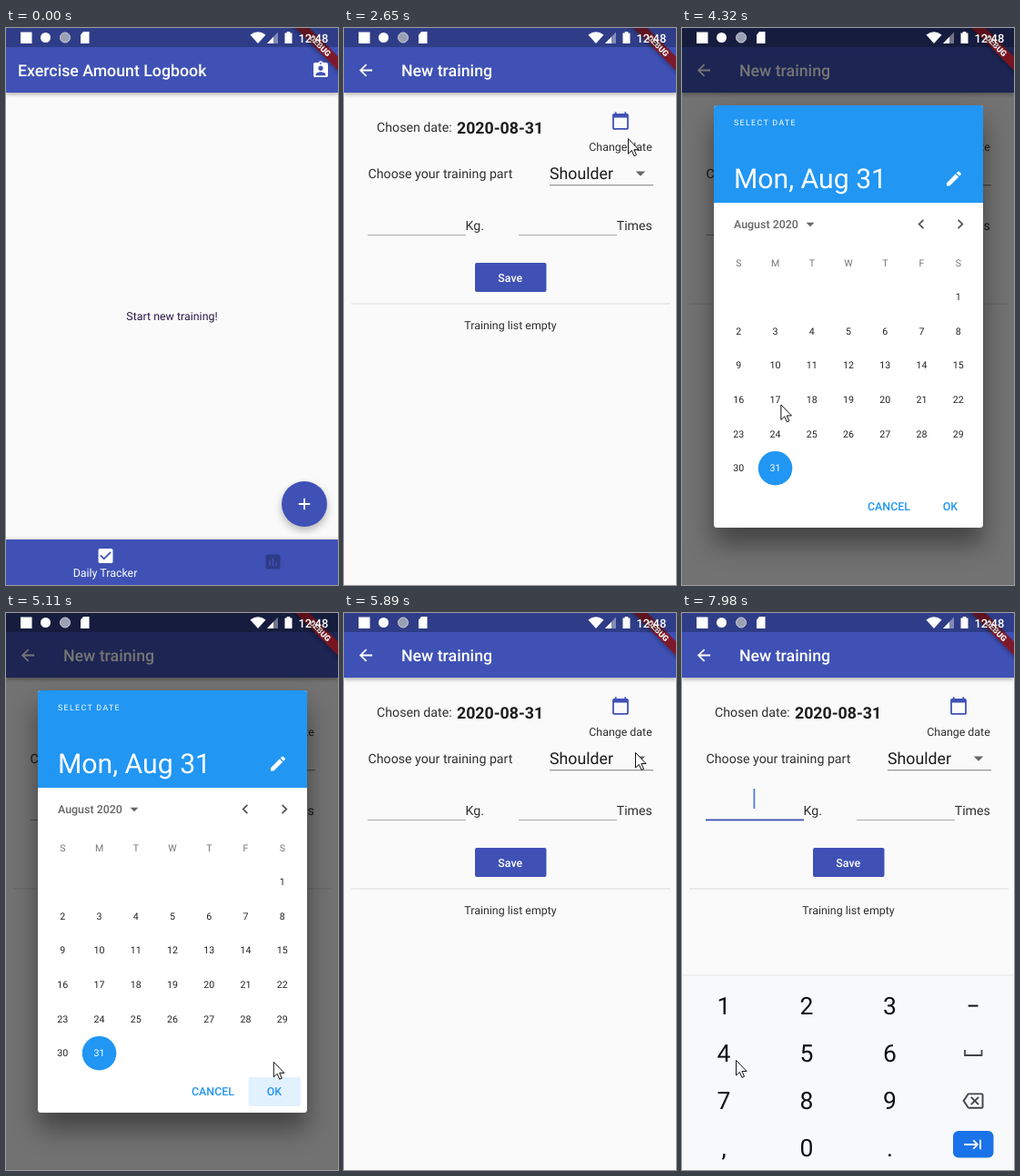
Recreate the animation shown at these times as an HTML page. Size 365 px wide and 612 px high, loop 8000 ms.

```html
<!DOCTYPE html>
<html lang="en">
<head>
<meta charset="utf-8">
<title>Training log</title>
<style>
html, body { margin: 0; width: 100%; height: 100%; overflow: hidden; background: #fafafa; }
svg { display: block; width: 365px; height: 612px; font-family: Roboto, Arial, sans-serif; text-rendering: geometricPrecision; }
.lift { filter: drop-shadow(0 2px 2px rgba(0,0,0,.3)); }
.fab { filter: drop-shadow(0 4px 4px rgba(0,0,0,.28)); }
.nav { filter: drop-shadow(0 -1px 1.5px rgba(0,0,0,.15)); }
.float { filter: drop-shadow(0 18px 14px rgba(0,0,0,.42)); }
</style>
</head>
<body>
<svg id="stage" viewBox="0 0 365 612"></svg>
<script>
const INDIGO = '#3f51b5', BLUE = '#2196f3', WHITE = '#fff', INK = '#2f2f2f';
const SMALL = 12.42, BODY = 14.2, LARGE = 17.74;

const ICONS = {
  add: 'M19 13h-6v6h-2v-6H5v-2h6V5h2v6h6z',
  back: 'M20 11H7.83l5.59-5.59L12 4l-8 8 8 8 1.41-1.41L7.83 13H20z',
  person: 'M19 3h-4.18C14.4 1.84 13.3 1 12 1s-2.4.84-2.82 2H5c-1.1 0-2 .9-2 2v14c0 1.1.9 2 2 2h14c1.1 0 2-.9 2-2V5c0-1.1-.9-2-2-2zm-7 0c.55 0 1 .45 1 1s-.45 1-1 1-1-.45-1-1 .45-1 1-1zm0 4c1.66 0 3 1.34 3 3s-1.34 3-3 3-3-1.34-3-3 1.34-3 3-3zm6 12H6v-1.4c0-2 4-3.1 6-3.1s6 1.1 6 3.1z',
  check: 'M19 3H5c-1.1 0-2 .9-2 2v14c0 1.1.9 2 2 2h14c1.1 0 2-.9 2-2V5c0-1.1-.9-2-2-2zm-9 14l-5-5 1.41-1.41L10 14.17l7.59-7.59L19 8z',
  chart: 'M19 3H5c-1.1 0-2 .9-2 2v14c0 1.1.9 2 2 2h14c1.1 0 2-.9 2-2V5c0-1.1-.9-2-2-2zM9 17H7v-7h2zm4 0h-2V7h2zm4 0h-2v-4h2z',
  calendar: 'M20 3h-1V1h-2v2H7V1H5v2H4c-1.1 0-2 .9-2 2v16c0 1.1.9 2 2 2h16c1.1 0 2-.9 2-2V5c0-1.1-.9-2-2-2zm0 18H4V8h16z',
  edit: 'M3 17.25V21h3.75L17.81 9.94l-3.75-3.75zM20.71 7.04a1 1 0 0 0 0-1.41l-2.34-2.34a1 1 0 0 0-1.41 0l-1.83 1.83 3.75 3.75z',
  left: 'M15.41 7.41L14 6l-6 6 6 6 1.41-1.41L10.83 12z',
  right: 'M10 6L8.59 7.41 13.17 12l-4.58 4.59L10 18l6-6z',
  drop: 'M7 10l5 5 5-5z',
  erase: 'M22 3H7c-.69 0-1.23.35-1.59.88L0 12l5.41 8.11c.36.53.9.89 1.59.89h15c1.1 0 2-.9 2-2V5c0-1.1-.9-2-2-2zm0 16H7.07L2.4 12l4.66-7H22zM10.41 17L14 13.41 17.59 17 19 15.59 15.41 12 19 8.41 17.59 7 14 10.59 10.41 7 9 8.41 12.59 12 9 15.59z',
  next: 'M11.59 7.41L15.17 11H1v2h14.17l-3.59 3.59L13 18l6-6-6-6zM20 6v12h2V6z'
};

// All shapes return SVG markup; text and icons are placed by their vertical centre.
const rect = (x, y, w, h, fill, extra = '') =>
  `<rect x="${x}" y="${y}" width="${w}" height="${h}" fill="${fill}" ${extra}/>`;
const circle = (x, y, r, fill, extra = '') =>
  `<circle cx="${x}" cy="${y}" r="${r}" fill="${fill}" ${extra}/>`;
const path = (d, fill, extra = '') => `<path d="${d}" fill="${fill}" ${extra}/>`;
const text = (x, y, size, str, fill = INK, extra = '') =>
  `<text x="${x}" y="${y + size * .355}" font-size="${size}" fill="${fill}" ${extra}>${str}</text>`;
const group = (id, ...parts) => `<g id="${id}">${parts.join('')}</g>`;
const icon = (name, x, y, fill, size = 21.3) =>
  `<path d="${ICONS[name]}" fill="${fill}" transform="translate(${x - size / 2} ${y - size / 2}) scale(${size / 24})"/>`;
const MID = 'text-anchor="middle" ', MEDIUM = 'font-weight="500"';

const appBar = (x, title) =>
  rect(0, 0, 365, 71, INDIGO, 'class="lift"') + text(x, 47, LARGE, title, WHITE, MEDIUM);

const home = group('home',
  rect(0, 0, 365, 612, '#fafafa'),
  appBar(13, 'Exercise Amount Logbook'),
  icon('person', 346, 46, WHITE),
  text(182.5, 316.5, SMALL, 'Start new training!', '#2a1a48', MID),
  circle(328, 523, 25, INDIGO, 'class="fab"'),
  icon('add', 328, 523, WHITE),
  circle(335, 525, 0, WHITE, 'id="fabSplash" opacity=".2"'),
  rect(0, 562, 365, 50, INDIGO, 'class="nav"'),
  icon('check', 109.5, 580, WHITE),
  text(109, 598.5, SMALL, 'Daily Tracker', WHITE, MID),
  icon('chart', 293.5, 586.5, '#2e3b85'));

const form = group('form',
  rect(0, 0, 365, 612, '#fafafa'),
  appBar(63, 'New training'),
  icon('back', 24, 46.5, WHITE),
  text(36, 109, BODY, 'Chosen date:'),
  text(124, 109.5, LARGE, '2020-08-31', '#1c1c1c', 'font-weight="700"'),
  icon('calendar', 304, 102, INDIGO),
  text(304, 131, SMALL, 'Change date', INK, MID),
  circle(312, 103, 0, '#000', 'id="iconSplash" opacity=".06"'),
  text(26.5, 159.5, BODY, 'Choose your training part'),
  text(226, 160, LARGE, 'Shoulder', '#1c1c1c'),
  icon('drop', 326, 159.5, '#666', 25),
  rect(226, 172, 114, 1.3, '#999'),
  rect(26, 227, 108, 1, '#aaa'),
  rect(26, 226.5, 108, 1.8, INDIGO, 'id="focusLine"'),
  rect(78.5, 193, 1.8, 22, '#4f7fe0', 'id="caret"'),
  text(133.5, 216.7, BODY, 'Kg.'),
  rect(192, 227, 108, 1, '#aaa'),
  text(299.7, 216.7, BODY, 'Times'),
  rect(144, 258, 78.5, 32, INDIGO, 'rx="2"'),
  text(182.7, 274.3, SMALL, 'Save', WHITE, MID + MEDIUM),
  rect(8, 302.5, 351, 1, '#dcdcdc'),
  text(183, 326.7, SMALL, 'Training list empty', INK, MID));

const column = i => 62.3 + i * 40.25;
const days = Array.from({ length: 31 }, (_, i) => {
  const cell = i + 6;
  return text(column(cell % 7), 295.5 + Math.floor(cell / 7) * 37.6, 10.64, i + 1, i == 30 ? WHITE : '#222', MID);
}).join('');

const dialog = group('dialog',
  rect(35, 85, 296, 464, WHITE, 'rx="3.5" class="float"'),
  path('M35 192V88.5a3.5 3.5 0 0 1 3.5-3.5H327.5a3.5 3.5 0 0 1 3.5 3.5V192z', BLUE),
  text(57, 104, 8.87, 'SELECT DATE', WHITE, 'letter-spacing="1.33"'),
  text(57, 165.5, 30.16, 'Mon, Aug 31', WHITE),
  icon('edit', 299, 165.5, WHITE),
  text(57, 216, SMALL, 'August 2020', '#666', MEDIUM),
  icon('drop', 141, 215.5, '#666'),
  icon('left', 263, 215.5, '#555'),
  icon('right', 306, 215.5, '#555'),
  [...'SMTWTFS'].map((d, i) => text(column(i), 258, 10.64, d, '#777', MID)).join(''),
  circle(column(1), 483.7, 18.8, BLUE),
  days,
  rect(266.5, 510, 57.5, 32, BLUE, 'id="okPress" rx="2" opacity="0"'),
  text(227.5, 526, SMALL, 'CANCEL', BLUE, MID + MEDIUM),
  text(295, 526, SMALL, 'OK', BLUE, MID + MEDIUM));

const banner = `<g transform="translate(365 0) rotate(45)">
  ${rect(-55, 22.2, 110, 10.7, '#84141c', 'opacity=".9" class="lift"')}
  ${text(0, 27.6, 9, 'DEBUG', WHITE, MID + 'font-weight="900"')}</g>`;

const statusBar = group('status',
  rect(0, 0, 365, 21, '#000', 'opacity=".25"'),
  rect(16, 4.5, 12.5, 12.5, WHITE),
  circle(43.5, 10.5, 5.5, WHITE),
  circle(65, 10.5, 5.5, '#9aa0b4', 'stroke="#c9ccd8"'),
  path('M85 4h6.5v13h-9.500V7.500z', WHITE),
  path('M268.5 7.500q8.500-6.500 17 0l-8.500 9.500z', WHITE),
  path('M287 17L299 4.500V17z', WHITE, 'opacity=".4"'),
  path('M287 17l7-7.300V17z', WHITE),
  path('M306.5 5.500h2.200V4h3.600v1.500h2.200V17h-8z', WHITE),
  text(321.5, 11.5, 12.9, '12:48', WHITE, MEDIUM));

const keyX = [46, 137, 228.5, 320], keyY = [432, 484, 536, 588];
const keyRows = ['123−', '456', '789', ',0.'];
const keyboard = group('keyboard',
  rect(0, 398, 365, 214, '#f7f9fb'),
  rect(0, 397.5, 365, 1, '#e4e6e8'),
  keyRows.map((row, r) => [...row].map((k, c) => text(keyX[c], keyY[r], 26.5, k, '#111', MID)).join('')).join(''),
  path('M311 480v6h18.5v-6', 'none', 'stroke="#444" stroke-width="1.8"'),
  icon('erase', 320, 536, '#444', 23),
  rect(298, 569, 44.5, 29.5, '#1a73e8', 'rx="6"'),
  icon('next', 320, 584, WHITE));

const cursor = path('M.5 .5V17l3.9-3.6 2.6 6 2.5-1.1-2.6-5.8h5.2z', WHITE,
  'id="cursor" stroke="#111" stroke-linejoin="round"');

const stage = document.getElementById('stage');
stage.innerHTML = home + form + rect(0, 0, 365, 612, '#000', 'id="barrier"') + dialog +
  banner + keyboard + statusBar + cursor;
const el = id => document.getElementById(id);

// Pointer waypoints: time, x, y
const ROUTE = [
  [200, 306, 578], [480, 335, 525], [1300, 335, 525], [1450, 298, 440], [1590, 267, 361],
  [1800, 285, 240], [2050, 304, 135], [2100, 304, 135], [2330, 312, 161], [2500, 312, 161],
  [2720, 312, 103], [3230, 312, 103], [3600, 250, 220], [3950, 130, 290], [4150, 88, 350],
  [4320, 108, 413], [4550, 190, 520], [4690, 330, 545], [4780, 296, 526], [5070, 296, 526],
  [5200, 289, 421], [5610, 312, 182], [5890, 320, 153], [6170, 320, 153], [6600, 190, 226],
  [6920, 73, 212], [7350, 73, 212], [7800, 95, 445], [7975, 59, 491], [8000, 59, 491]
];

const span = (t, a, b) => Math.min(1, Math.max(0, (t - a) / (b - a)));
const easeOut = p => 1 - (1 - p) ** 3;

function pointer(t) {
  const i = Math.max(1, ROUTE.findIndex(k => k[0] > t));
  const [t0, x0, y0] = ROUTE[i - 1], [t1, x1, y1] = ROUTE[i];
  const p = span(t, t0, t1);
  return [x0 + (x1 - x0) * p, y0 + (y1 - y0) * p];
}

const fade = (id, value) => { el(id).style.opacity = value; };
const move = (id, x, y) => el(id).setAttribute('transform', `translate(${x} ${y})`);

function draw(t) {
  const enter = span(t, 1260, 1560);
  fade('form', enter ** 1.5);
  move('form', 0, 153 * (1 - easeOut(enter)));
  el('fabSplash').setAttribute('r', t < 750 ? 0 : 4 + 8 * span(t, 750, 860));
  el('iconSplash').setAttribute('r', t < 2750 || t > 3210 ? 0 : 6 + 16 * span(t, 2750, 2890));

  const opened = span(t, 3140, 3205);
  fade('dialog', opened * (1 - span(t, 5140, 5290)));
  fade('barrier', .54 * opened * (1 - span(t, 5150, 5310)));
  fade('okPress', .13 * span(t, 4840, 4960));

  fade('focusLine', span(t, 7000, 7150));
  fade('caret', t >= 7010 && t < 7430 || t >= 7920 ? 1 : 0);
  move('keyboard', 0, 216 * (1 - easeOut(span(t, 7190, 7450))));

  fade('cursor', t >= 200 ? 1 : 0);
  move('cursor', ...pointer(t));
}

const start = performance.now();
function tick() {
  draw((performance.now() - start) % 8000);
  requestAnimationFrame(tick);
}
tick();
</script>
</body>
</html>
```
